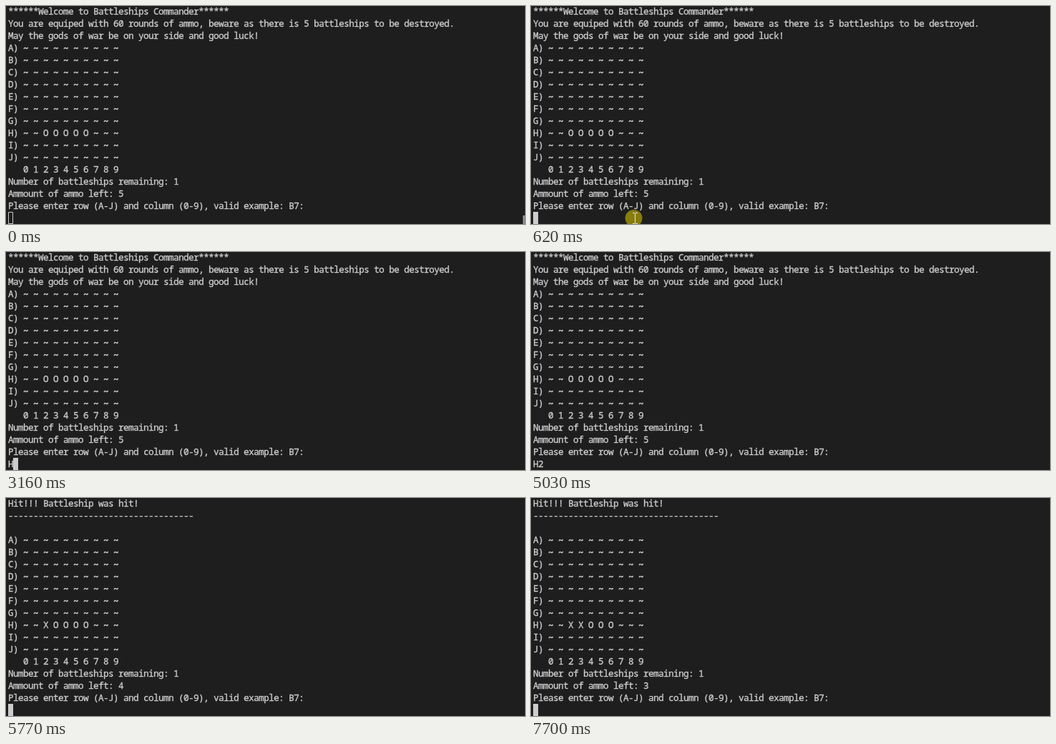
Animation of 725 by 305 pixels, one loop 8000 ms. Source, as an HTML page with a canvas:

```html
<!DOCTYPE html>
<html lang="en">
<head>
<meta charset="utf-8">
<title>Battleships Commander</title>
<style>
  html, body { margin: 0; width: 100%; height: 100%; overflow: hidden; background: #1e1e1e; }
  canvas { display: block; }
</style>
</head>
<body>
<canvas id="stage" width="725" height="305"></canvas>
<script>
const ctx = document.getElementById('stage').getContext('2d');
const LOOP = 8000, LEFT = 3, CELL = 7, LINE = 17, INPUT_ROW = 17;
const BACK = '#1e1e1e', INK = '#cccccc';
const FONT = '12.6px "Noto Sans Mono", "DejaVu Sans Mono", monospace';

const WELCOME = [
  '******Welcome to Battleships Commander******',
  'You are equiped with 60 rounds of ammo, beware as there is 5 battleships to be destroyed.',
  'May the gods of war be on your side and good luck!'
];
const HIT = ['Hit!!! Battleship was hit!', '-'.repeat(37), ''];

// Typed input and the cell of the block cursor (-1 hides it)
const TYPING = [
  { at: 0, text: '', cursor: 0 },
  { at: 3160, text: 'H', cursor: 1 },
  { at: 5030, text: 'H2', cursor: -1 },
  { at: 5100, text: 'H2', cursor: 2 },
  { at: 5770, text: '', cursor: 0 },
  { at: 6570, text: 'H', cursor: 1 },
  { at: 7100, text: 'H3', cursor: 2 },
  { at: 7700, text: '', cursor: 0 }
];

const MOVE = { start: 70, end: 415 };
const CLICK = { start: 480, end: 690 };
const POINTER_GONE = 1690;

function boardRow(letter, hits) {
  const ship = 'X'.repeat(hits) + 'O'.repeat(5 - hits);
  const cells = letter === 'H' ? '~~' + ship + '~~~' : '~'.repeat(10);
  return letter + ') ' + [...cells].join(' ');
}

function screenLines(hits) {
  return [
    ...(hits ? HIT : WELCOME),
    ...[...'ABCDEFGHIJ'].map(letter => boardRow(letter, hits)),
    '   ' + [...'0123456789'].join(' '),
    'Number of battleships remaining: 1',
    'Ammount of ammo left: ' + (5 - hits),
    'Please enter row (A-J) and column (0-9), valid example: B7:'
  ];
}

// A fine outline gives the letters their weight; waves sit lower and heavier.
function drawLine(text, row) {
  ctx.fillStyle = ctx.strokeStyle = INK;
  ctx.lineJoin = 'round';
  [...text].forEach((char, i) => {
    if (char === ' ') return;
    const wave = char === '~';
    const x = LEFT + i * CELL, y = row * LINE + (wave ? 13 : 12);
    ctx.lineWidth = wave ? 0.6 : 0.35;
    ctx.fillText(char, x, y);
    ctx.strokeText(char, x, y);
  });
}

function drawCursor(cell, focused) {
  const x = LEFT + cell * CELL, y = INPUT_ROW * LINE - 1;
  if (focused) {
    ctx.fillStyle = INK;
    ctx.fillRect(x, y, CELL, LINE);
  } else {
    ctx.strokeStyle = INK;
    ctx.lineWidth = 1;
    ctx.strokeRect(x + 0.5, y + 0.5, CELL - 1, LINE - 1);
  }
}

function pointerPosition(t) {
  const p = Math.min(1, (t - MOVE.start) / (MOVE.end - MOVE.start));
  const ease = 1 - (1 - p) ** 2;
  return {
    x: Math.round(722 - 577 * ease),
    y: Math.round(297 - 15 * Math.sin(Math.PI * ease))
  };
}

function drawPointer({ x, y }) {
  ctx.fillStyle = '#e4e4e4';
  for (const edge of [y - 8, y + 7]) {
    ctx.fillRect(x - 3, edge, 3, 1);
    ctx.fillRect(x + 1, edge, 3, 1);
  }
  ctx.fillRect(x, y - 7, 1, 14);
}

function drawClick() {
  ctx.fillStyle = 'rgba(200, 184, 0, 0.62)';
  ctx.beginPath();
  ctx.arc(143.5, 297, 12, 0, Math.PI * 2);
  ctx.fill();
}

function draw(t) {
  ctx.fillStyle = BACK;
  ctx.fillRect(0, 0, 725, 305);
  ctx.font = FONT;
  const hits = t < 5770 ? 0 : t < 7700 ? 1 : 2;
  screenLines(hits).forEach(drawLine);

  const input = TYPING.filter(step => step.at <= t).pop();
  drawLine(input.text, INPUT_ROW);
  if (input.cursor >= 0) drawCursor(input.cursor, t >= CLICK.start);

  if (t < MOVE.start) {
    ctx.fillStyle = '#8c8c8c';
    ctx.fillRect(722, 293, 3, 12);
  } else if (t < POINTER_GONE) {
    if (t >= CLICK.start && t < CLICK.end) drawClick();
    drawPointer(pointerPosition(t));
  }
}

const origin = performance.now();
function frame() {
  draw((performance.now() - origin) % LOOP);
  requestAnimationFrame(frame);
}
frame();
</script>
</body>
</html>
```
